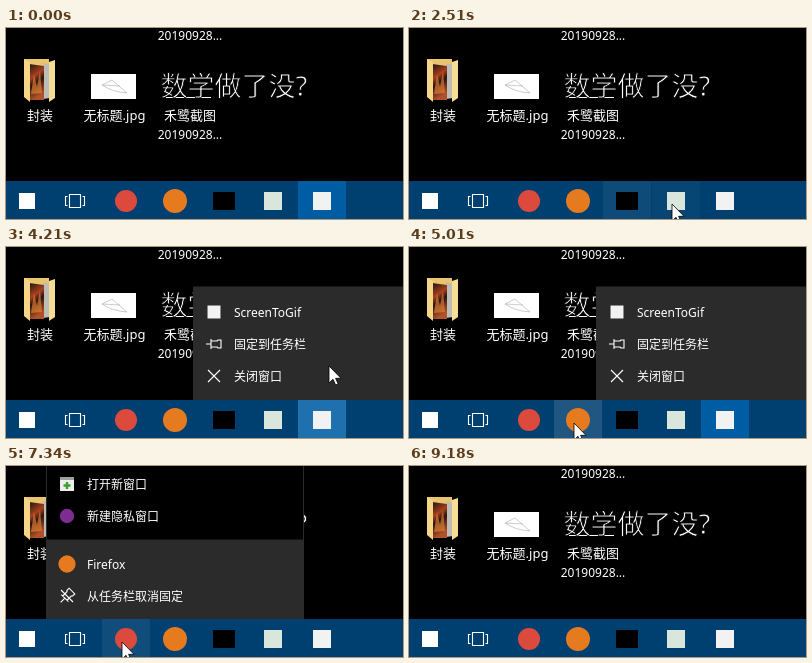
An HTML page that plays this animation: 397x191 px, repeating every 9970 ms.

```html
<!DOCTYPE html>
<html lang="zh-CN">
<head>
<meta charset="utf-8">
<title>任务栏菜单</title>
<style>
  html, body { margin: 0; width: 100%; height: 100%; overflow: hidden; background: #000; }
  svg { display: block; width: 397px; height: 191px; }
  text { font: 12px "Noto Sans", "Noto Sans CJK SC", "Noto Sans CJK", sans-serif; fill: #fff; }
  .name { font-size: 13px; }
  .name, .date { text-anchor: middle; }
  .note { font-size: 27px; font-weight: 300; stroke: #000; stroke-width: .8; }
  .line { fill: none; stroke: #fff; stroke-width: 1.1; }
</style>
</head>
<body>
<svg viewBox="0 0 397 191">
  <defs>
    <linearGradient id="flame" x2="0.3" y2="1">
      <stop offset="0" stop-color="#1d1514"/>
      <stop offset="0.4" stop-color="#a8401d"/>
      <stop offset="0.6" stop-color="#2c1512"/>
      <stop offset="1" stop-color="#b0522a"/>
    </linearGradient>
    <g id="cmd"><rect x="-11" y="-9" width="22" height="18" fill="#000"/></g>
    <g id="tools"><rect x="-9" y="-9" width="18" height="18" fill="#d8e6db"/></g>
    <g id="recorder"><rect x="-9" y="-9" width="18" height="18" fill="#f2f2f2"/></g>
    <g id="fox"><circle r="12" fill="#e57a1f"/></g>
    <g id="web"><circle r="11" fill="#dc4a3d"/></g>
    <g id="mask"><circle r="10" fill="#7d2c92"/></g>
    <g id="pin" class="line"><path d="M-8 0H-3M-3-5V5M-3-3H3L4-4H7V4H4L3 3H-3"/></g>
    <g id="unpin" class="line"><path transform="rotate(-45)" d="M-9 0H-3M-3-5V5M-3-3H3L4-4H7V4H4L3 3H-3"/><path d="M-6-6L6 6"/></g>
    <g id="close" class="line"><path d="M-6-6L6 6M6-6L-6 6"/></g>
    <g id="add">
      <path d="M-7-7H7V7H-7Z" fill="#eee"/><path d="M-7-7H7V-4H-7Z" fill="#9aa39a"/>
      <path d="M-3.5 1.5H3.5M0-2V5" stroke="#38a32c" stroke-width="2.4"/>
    </g>
  </defs>

  <path d="M18 31H43V68H18Z" fill="#e9c56d"/>
  <path d="M37 35L44 37V70L37 71Z" fill="#bdbdb8"/>
  <path d="M23 36L38 38V72L23 72Z" fill="url(#flame)"/>
  <path d="M25 66L28 46L31 59L34 43L36 65Z" fill="#ed8a36" opacity=".6"/>
  <path d="M43 34L49 32V70L43 74Z" fill="#f6dc94"/>
  <path d="M18 31L24 34V74L18 69Z" fill="#f5d687"/>
  <rect x="85" y="46" width="45" height="25" fill="#fff"/>
  <path d="M96 57L106 52L121 65Q106 64 96 57L114 58" fill="none" stroke="#aaa" stroke-width=".6"/>
  <path d="M160 69.5H205" stroke="#fff"/>
  <text class="date" x="184" y="12">20190928...</text>
  <text class="name" x="34" y="92">封装</text>
  <text class="name" x="108.5" y="92">无标题.jpg</text>
  <text class="name" x="184" y="92">禾鹭截图</text>
  <text class="date" x="184" y="110.5">20190928...</text>
  <text class="note" x="154.5" y="67.5">数学做了没?</text>

  <g id="menus"></g>
  <rect y="153" width="397" height="38" fill="#004071"/>
  <rect id="active" x="292" y="153" width="48" height="38" fill="#005ca3"/>
  <g id="hovers" fill="#fff"></g>
  <rect x="13" y="165" width="16" height="16" fill="#fff"/>
  <path class="line" d="M63.5 166.5H74.5V179.5H63.5ZM61.5 168.5H59.5V177.5H61.5M76.5 168.5H78.5V177.5H76.5"/>
  <g id="icons"></g>
  <path id="cursor" d="M0 0V17L4 13.3L6.6 19L9.2 18L6.6 12.3H12Z" fill="#fff" stroke="#000" stroke-width=".8"/>
</svg>
<script>
const LOOP = 9970, MENU_WIDTH = 258, BAR_TOP = 153, GLIDE = 360;
const $ = id => document.getElementById(id);
const clamp = v => Math.max(0, Math.min(1, v));
const easeOut = v => 1 - (1 - clamp(v)) ** 2;
const slotX = slot => 120 + 49 * slot;

const windowRows = (icon, title) => [['close', '关闭窗口'], ['pin', '固定到任务栏'], [icon, title]];
const launcherRows = (icon, title) =>
  [['unpin', '从任务栏取消固定'], [icon, title], ['mask', '新建隐私窗口'], ['add', '打开新窗口']];

// The pointer reaches an icon, its menu opens, the pointer peeks into it, leaves, and the menu closes.
const visits = [
  { slot: 2, reach: 810, open: 1040, peek: 1490, leave: 1770, close: 2340, rows: windowRows('cmd', '命令提示符') },
  { slot: 3, reach: 2510, open: 2650, peek: 2900, leave: 2900, close: 3690, rows: windowRows('tools', '岚芽工具箱-常规模式') },
  { slot: 4, reach: 3610, open: 3840, peek: 4210, leave: 4210, close: 5720, rows: windowRows('recorder', 'ScreenToGif') },
  { slot: 1, reach: 4650, open: 6340, peek: 6160, leave: 6500, close: 7350, rows: launcherRows('fox', 'Firefox') },
  { slot: 0, reach: 7260, open: 7560, peek: 8020, leave: 8520, close: 8520, rows: launcherRows('web', 'Plovia Tessel') }
];

function pathOf({ slot, reach, peek, leave }) {
  const icon = { x: slotX(slot) - 4, y: 176 }, inside = { x: slotX(slot) + 8, y: 119 };
  return [
    { t: reach, ...icon }, { t: Math.max(reach, peek - GLIDE), ...icon },
    { t: peek, ...inside }, { t: leave, ...inside }
  ];
}
const path = [{ t: 210, x: 282, y: 38 }, ...visits.flatMap(pathOf), { t: 9150, x: 397, y: 126 }];

function menuMarkup({ slot, rows }) {
  const x = slotX(slot) - MENU_WIDTH / 2, hasTasks = rows.length > 3;
  const base = hasTasks ? 130 : 129;
  const panel = (y, fill) =>
    `<rect x="${x + .5}" y="${y}" width="${MENU_WIDTH - 1}" height="240" fill="${fill}" stroke="#2b2b2b"/>`;
  const items = rows.map(([icon, label], i) => {
    const y = base - 32 * i - (i > 1 && hasTasks ? 16 : 0);
    const scale = /pin|close|add/.test(icon) ? 1 : 0.72;
    return `<use href="#${icon}" transform="translate(${x + 21} ${y}) scale(${scale})"/>` +
      `<text x="${x + 41}" y="${y + 4.5}" font-weight="500">${label}</text>`;
  });
  return `<g>${hasTasks ? panel(-60, '#000') + panel(74, '#2b2b2b') : panel(40, '#2b2b2b')}${items.join('')}</g>`;
}

$('menus').innerHTML = visits.map(menuMarkup).join('');
$('hovers').innerHTML = visits.map(({ slot }) =>
  `<rect x="${slotX(slot) - 24}" y="${BAR_TOP}" width="48" height="38"/>`).join('');
$('icons').innerHTML = ['web', 'fox', 'cmd', 'tools', 'recorder'].map((icon, slot) =>
  `<use href="#${icon}" x="${slotX(slot)}" y="173"/>`).join('');

function pointerAt(t) {
  const i = path.findIndex(p => p.t > t);
  if (i < 1) return null;
  const a = path[i - 1], b = path[i], k = easeOut((t - a.t) / (b.t - a.t));
  return [a.x + (b.x - a.x) * k, a.y + (b.y - a.y) * k].map(Math.round);
}

function draw(t) {
  visits.forEach(({ reach, open, close }, i) => {
    const shown = easeOut((t - open) / 200);
    const menu = $('menus').children[i];
    menu.setAttribute('opacity', shown * (1 - clamp((t - close) / 110)));
    menu.setAttribute('transform', `translate(0 ${(1 - shown) * 38})`);

    const left = visits[i + 1]?.reach ?? close + 100;
    const hover = clamp((t - reach + 60) / 250) * (1 - clamp((t - left + 60) / 120));
    $('hovers').children[i].setAttribute('opacity', 0.12 * hover);
  });
  const recorder = visits[2];
  const isActive = t < visits[0].open || (t > recorder.open && t < recorder.close);
  $('active').setAttribute('visibility', isActive ? 'visible' : 'hidden');

  const tip = pointerAt(t);
  $('cursor').setAttribute('visibility', tip ? 'visible' : 'hidden');
  if (tip) $('cursor').setAttribute('transform', `translate(${tip})`);
}

const start = performance.now();
function tick() {
  draw((performance.now() - start) % LOOP);
  requestAnimationFrame(tick);
}
tick();
</script>
</body>
</html>
```
